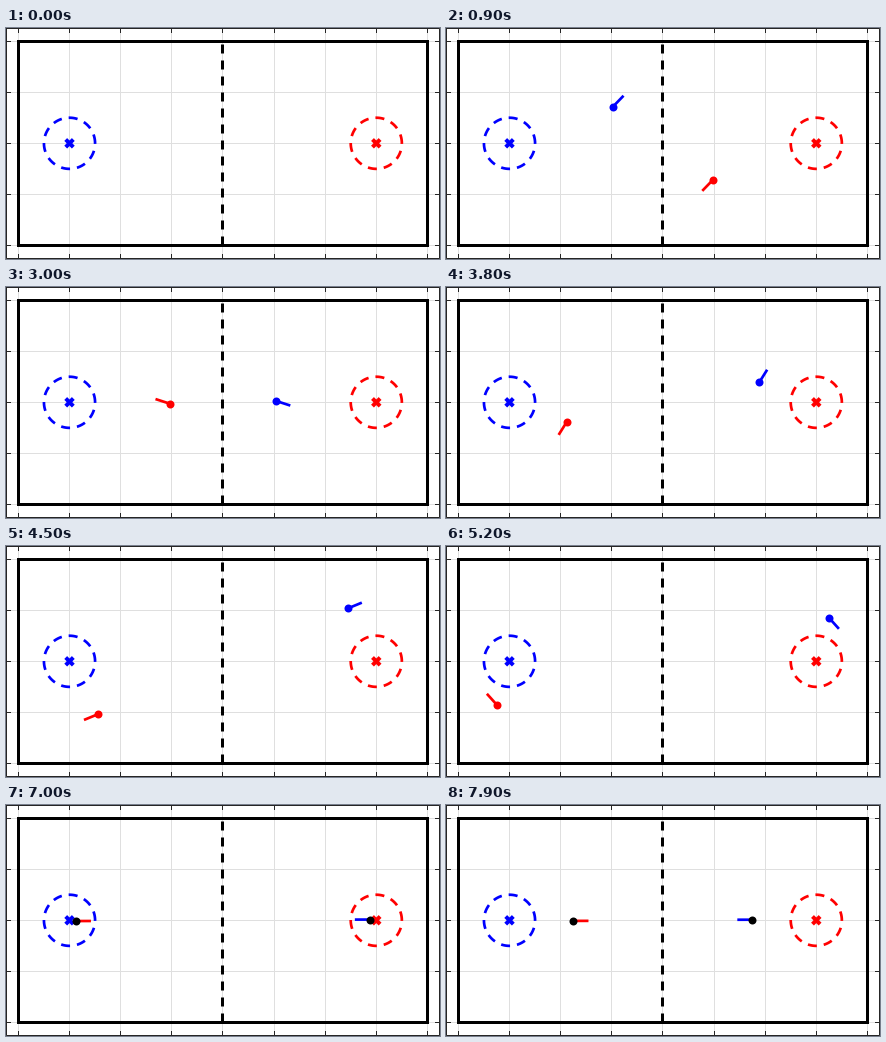
Write a matplotlib script that moves like this. It is 434 px wide and 231 px high and loops after 8 s.

```python
import numpy as np
import matplotlib.pyplot as plt
from matplotlib.animation import FuncAnimation

W, H, DPI = 434, 231, 100
PX = 72 / DPI                         # points per pixel
CX, CY, UNIT = 216.9, 115.3, 51.13    # field centre and grid spacing
STEP, FRAMES = 100, 80                # ms per frame, frames per loop
SPEED = UNIT / 800                    # pixels per ms
START, OUT = 100, 6100                # first appearance, crossing the end line
BLUE, RED, DARK = "#0000ff", "#ff0000", "#262626"
HEADING = 15                          # length of the heading line
TICK = 5

fig = plt.figure(figsize=(W / DPI, H / DPI), dpi=DPI, facecolor="white")
ax = fig.add_axes([0, 0, 1, 1])
ax.set_xlim(0, W)
ax.set_ylim(H, 0)
ax.axis("off")


def line(x, y, color, width, **kw):
    kw.setdefault("solid_capstyle", "butt")
    return ax.plot(x, y, color=color, lw=width * PX, snap=False, **kw)[0]


def dashed(x, y, color, width):
    line(x, y, color, width, dashes=(9 / width, 7 / width),
         dash_capstyle="butt")


def box(l, t, r, b, color, width):
    line([l, r, r, l, l], [t, t, b, b, t], color, width,
         solid_joinstyle="miter", solid_capstyle="projecting")


def draw_field():
    # pixel centres keep the straight lines crisp
    xs = np.floor(CX + UNIT * np.arange(-4, 5)) + 0.5
    ys = np.floor(CY + UNIT * np.arange(-2, 3)) + 0.5
    for x in xs:
        line([x, x], [0, H], "#dfdfdf", 1)
    for y in ys:
        line([0, W], [y, y], "#dfdfdf", 1)
    for x in xs:
        line([x, x], [0, TICK], DARK, 1)
        line([x, x], [H - TICK, H], DARK, 1)
    for y in ys:
        line([0, TICK], [y, y], DARK, 1)
        line([W - TICK, W], [y, y], DARK, 1)
    box(0.5, 0.5, W - 0.5, H - 0.5, DARK, 1)
    box(xs[0], ys[0], xs[-1], ys[-1], "black", 3)
    dashed([xs[4], xs[4]], [ys[-1], ys[0]], "black", 3)


def draw_base(x, color):
    a = np.linspace(0, 2 * np.pi, 120)
    dashed(x + UNIT / 2 * np.cos(a), CY - UNIT / 2 * np.sin(a), color, 2.7)
    for s in (1, -1):
        line([x - 3.8, x + 3.8], [CY - 3.8 * s, CY + 3.8 * s], color, 4)


def build_path():
    """Pose of the blue agent every 10 ms from START to OUT."""
    dt = 10
    t = np.arange(START, OUT + dt, dt)
    turns = [START, 1110, 2120, 2640, 3735, 4145, 5200]
    angles = [-46, -46, 55, 55, -58, -58, 48]
    ang = np.radians(np.interp(t, turns, angles))
    mid = np.radians(np.interp(t[:-1] + dt / 2, turns, angles))
    x = 131.6 + np.r_[0, np.cumsum(np.cos(mid))] * SPEED * dt
    y = CY + np.r_[0, np.cumsum(np.sin(mid))] * SPEED * dt
    return x, y, ang


X, Y, ANG = build_path()
HOME = CX - 3 * UNIT


def pose(ms):
    if ms <= OUT:
        i = (ms - START) // 10
        return X[i], Y[i], ANG[i]
    a = np.arctan2(CY - Y[-1], HOME - X[-1])
    d = SPEED * (ms - OUT)
    return X[-1] + d * np.cos(a), Y[-1] + d * np.sin(a), a


def make_agent(color):
    nose = line([], [], color, 2.7, zorder=5)
    head, = ax.plot([], [], "o", ms=8 * PX, mew=0, snap=False, zorder=6)
    return nose, head, color


draw_field()
draw_base(HOME, BLUE)
draw_base(CX + 3 * UNIT, RED)
agents = [make_agent(BLUE), make_agent(RED)]


def update(n):
    ms = n * STEP
    for (nose, head, color), side in zip(agents, (1, -1)):
        nose.set_visible(ms >= START)
        head.set_visible(ms >= START)
        if ms < START:
            continue
        x, y, a = pose(ms)
        x, y = CX + side * (x - CX), CY + side * (y - CY)
        nose.set_data([x, x + side * HEADING * np.cos(a)],
                      [y, y + side * HEADING * np.sin(a)])
        head.set_data([x], [y])
        head.set_color("black" if ms >= OUT else color)
    return [part for agent in agents for part in agent[:2]]


anim = FuncAnimation(fig, update, frames=FRAMES, interval=STEP,
                     repeat=True, repeat_delay=0)
plt.show()
```
